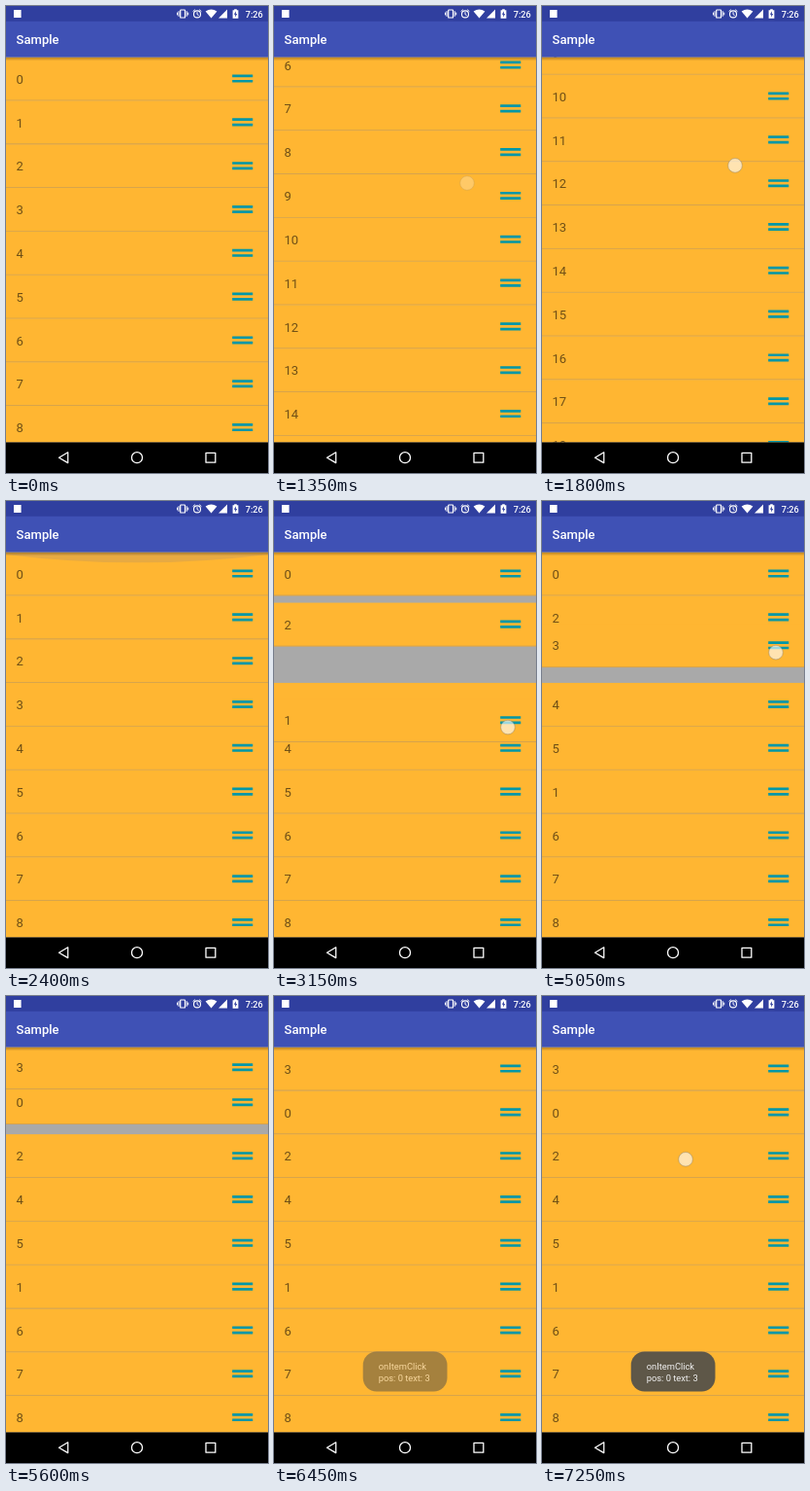
An HTML page for the animation above (8000 ms loop, 270 px wide and 480 px high).

```html
<!DOCTYPE html>
<html lang="en">
<head>
<meta charset="utf-8">
<title>Sample</title>
<style>
  html, body { margin: 0; width: 100%; height: 100%; overflow: hidden; background: #000; }
  svg { display: block; width: 100vw; height: 100vh; font-family: Roboto, sans-serif; }
  .row text { font-size: 13.1px; fill: rgba(0, 0, 0, .57); }
  .title { font-size: 13.1px; font-weight: 500; fill: #fff; }
  .clock { font-size: 9.2px; font-weight: 500; fill: #fff; text-anchor: end; }
  .toast text { font-size: 9.3px; fill: #f2f2f2; }
  .line { fill: none; stroke: #fff; }
</style>
</head>
<body>
<svg viewBox="0 0 270 480">
  <defs>
    <clipPath id="window"><rect y="52.5" width="270" height="396"/></clipPath>
    <linearGradient id="shade" x2="0" y2="1">
      <stop stop-color="#000" stop-opacity=".3"/>
      <stop offset="1" stop-color="#000" stop-opacity="0"/>
    </linearGradient>
  </defs>

  <rect y="52" width="270" height="397" fill="#a9a9a9"/>
  <g clip-path="url(#window)">
    <g id="list"></g>
    <path id="glow" fill="#3f51b5"/>
    <rect y="52.5" width="270" height="4" fill="url(#shade)"/>
  </g>

  <rect width="270" height="52.5" fill="#3f51b5"/>
  <rect width="270" height="15.75" fill="#303f9f"/>
  <text class="title" x="10.5" y="39.2">Sample</text>

  <g fill="#fff">
    <rect x="8" y="4" width="7.6" height="8"/>
    <g class="line">
      <rect x="179.7" y="4" width="4.8" height="8" rx=".6" stroke-width="1.2"/>
      <path d="M178 5.2v5.6M186.2 5.2v5.6M176.5 6.6v2.8M187.7 6.6v2.8"/>
      <circle cx="197" cy="8.4" r="3.5" stroke-width="1.1"/>
      <path d="M197 6.2v2.4l1.6 1M192.6 5.6l2.2-1.9M201.4 5.6l-2.2-1.9"/>
    </g>
    <path d="M205.6 5.6Q211.5 1.2 217.4 5.6L211.5 12.6Z"/>
    <path d="M219 12.4L228 3.4V12.4Z"/>
    <path d="M233.6 4.3h1.6v-1h2.6v1h1.6v8.4h-5.8z"/>
    <path d="M236.9 5.3l-2 3.5h1.3v2.8l2-3.7h-1.3z" fill="#303f9f"/>
  </g>
  <text class="clock" x="264.8" y="11.5">7:26</text>

  <rect y="448.5" width="270" height="31.5" fill="#000"/>
  <g class="line" stroke-width="1.3" stroke-linejoin="round">
    <path d="M63.8 458.8V469.6L54.6 464.2Z"/>
    <circle cx="135" cy="464.2" r="5.5"/>
    <rect x="206" y="459.4" width="9.8" height="9.8"/>
  </g>

  <g class="toast" id="toast">
    <rect x="91.7" y="365.4" width="86.8" height="41.2" rx="14" fill="rgb(68,72,76)" fill-opacity=".86"/>
    <text x="107.8" y="383.9">onItemClick</text>
    <text x="107.8" y="395.7">pos: 0 text: 3</text>
  </g>
  <circle id="pointer" r="7.3" fill="#fff" fill-opacity=".62" stroke="#777" stroke-opacity=".4"/>
</svg>

<script>
const LOOP = 8000, TOP = 52.5, PITCH = 44.8125, ROWS = 20, FADE = 70;
const $ = id => document.getElementById(id);
const list = $('list'), glow = $('glow'), toast = $('toast'), pointer = $('pointer');

const ease = {
  linear: p => p,
  in: p => p ** 1.8,
  out: p => 1 - (1 - p) ** 2,
  fling: p => 1 - (1 - p) ** 3,
  inOut: p => (1 - Math.cos(Math.PI * p)) / 2
};

// Keys are [time, value, easing of the stretch that ends here].
function track(keys, t) {
  if (t <= keys[0][0]) return keys[0][1];
  for (let i = 1; i < keys.length; i++) {
    const [t0, v0] = keys[i - 1], [t1, v1, kind = 'linear'] = keys[i];
    if (t < t1) return v0 + (v1 - v0) * ease[kind]((t - t0) / (t1 - t0));
  }
  return keys[keys.length - 1][1];
}

const swap = (start, from, to) => [[start, from], [start + 250, to, 'inOut']];

const slots = {
  0: swap(5430, 0, 1),
  1: [[2650, 1], [2967, 2.2, 'in'], [3150, 3.355], [3600, 4.93, 'out'], [3720, 4.93], [3900, 5, 'out']],
  2: [...swap(2967, 2, 1), ...swap(5130, 1, 2)],
  3: [...swap(3170, 3, 2), [4900, 2], [5450, -.03, 'inOut'], [5600, -.03], [5700, 0, 'out']],
  4: swap(3370, 4, 3),
  5: swap(3560, 5, 4)
};
const slotOf = (id, t) => slots[id] ? track(slots[id], t) : id;

const swipeUp = [[930, 405], [1310, 182, 'in']];
const swipeDown = [[1740, 150], [2030, 380, 'in']];
const scroll = [[930, 0], [1310, 223, 'in'], [1720, 444, 'fling'], [1740, 444],
                [2030, 214, 'in'], [2190, 0]];
const glowSize = [[2180, 0], [2240, 1, 'out'], [2550, 0]];
const toastFade = [[6250, 0], [6850, 1, 'out']];

const onHandle = id => t => TOP + (slotOf(id, t) + .5) * PITCH + 7;
const touches = [
  { down: 900, up: 1310, x: 199, y: t => track(swipeUp, t) },
  { down: 1720, up: 2030, x: 199, y: t => track(swipeDown, t) },
  { down: 2600, up: 3720, x: 241, y: onHandle(1) },
  { down: 4850, up: 5480, x: 241, y: onHandle(3) },
  { down: 6100, up: 6220, x: 148, y: () => 78 },
  { down: 7250, up: LOOP, x: 148, y: () => 167.8 }
];

list.innerHTML = Array.from({ length: ROWS }, (_, id) => `
  <g class="row">
    <rect width="270" height="${PITCH}" fill="#ffb632"/>
    <rect y="44.1" width="270" height=".75" fill="#c89d55"/>
    <text x="10.5" y="27.2">${id}</text>
    <path d="M233.2 18h21.1v2.7h-21.1zm0 5.4h21.1v2.7h-21.1z" fill="#0097a7"/>
  </g>`).join('');
const rows = [...list.children];

function draw(t) {
  const offset = track(scroll, t);
  rows.forEach((row, id) =>
    row.setAttribute('transform', `translate(0 ${TOP + slotOf(id, t) * PITCH - offset})`));
  const dragged = rows[t < 4800 ? 1 : 3];
  if (list.lastElementChild !== dragged) list.append(dragged);

  const size = track(glowSize, t);
  glow.setAttribute('d', `M0 52V${52.5 + 5 * size}Q135 ${52.5 + 40 * size} 270 ${52.5 + 5 * size}V52Z`);
  glow.setAttribute('opacity', .25 * size);

  toast.setAttribute('opacity', track(toastFade, t));

  const touch = touches.find(({ down, up }) => t >= down && t < up + FADE);
  pointer.setAttribute('opacity', touch ? Math.min(1, 1 - (t - touch.up) / FADE) : 0);
  if (touch) {
    pointer.setAttribute('cx', touch.x);
    pointer.setAttribute('cy', touch.y(t));
  }
}

const start = performance.now();
function frame() {
  draw((performance.now() - start) % LOOP);
  requestAnimationFrame(frame);
}
frame();
</script>
</body>
</html>
```
